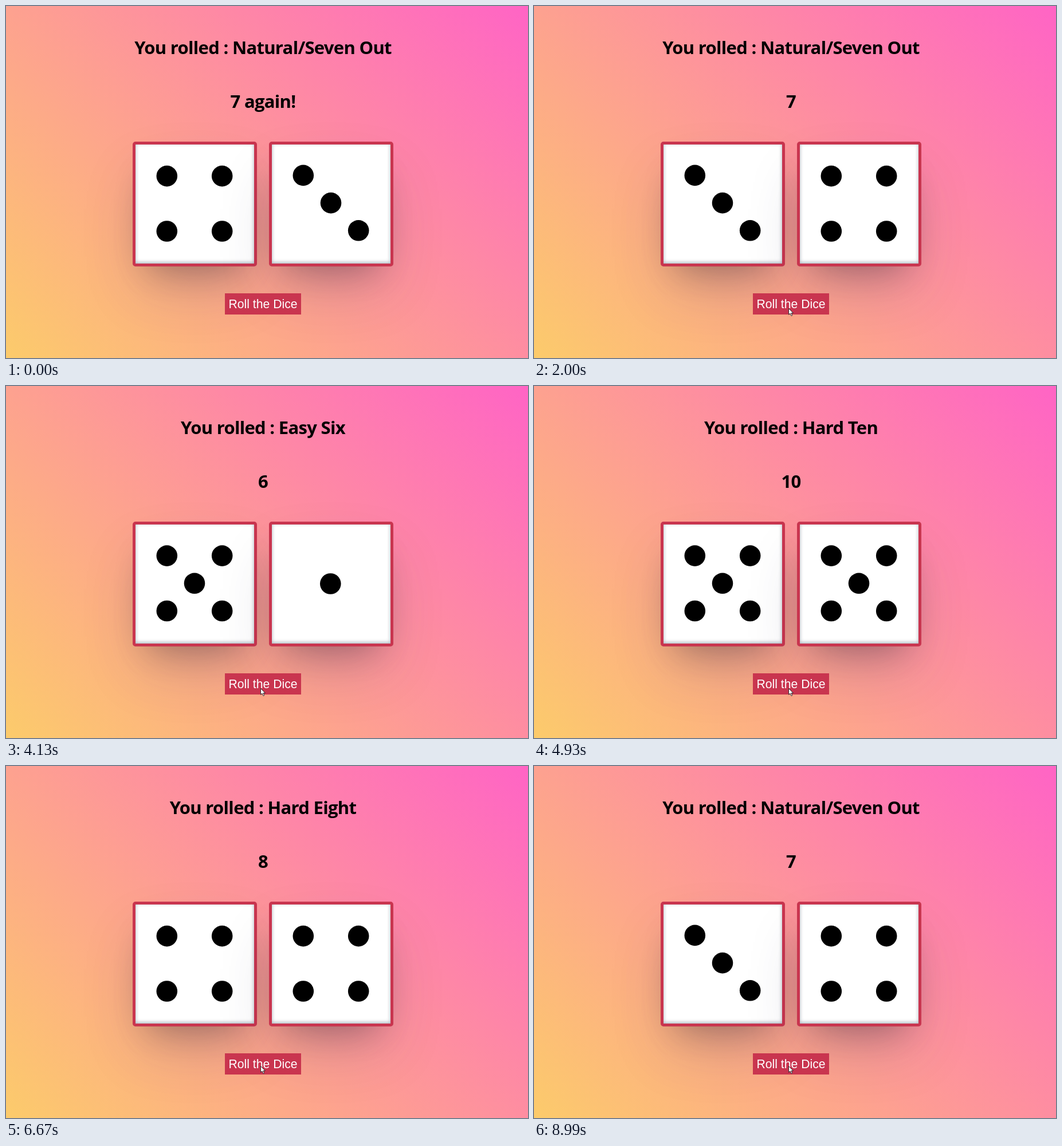
Recreate the animation shown at these times as an HTML page. Size 911 px wide and 615 px high, loop 9.39 s.

```html
<!DOCTYPE html>
<html lang="en">
<head>
<meta charset="utf-8">
<title>Roll the Dice</title>
<style>
  html, body { margin: 0; width: 100%; height: 100%; overflow: hidden; }
  #stage {
    position: relative; width: 911px; height: 615px; overflow: hidden;
    background: linear-gradient(45deg, #fccb6b, #ff64c5);
  }
  #stage > * { position: absolute; box-sizing: border-box; }
  .line {
    left: 0; width: 897px; text-align: center; white-space: pre; color: #000;
    font: 700 31px/42px "Open Sans", "Noto Sans", sans-serif; letter-spacing: -.7px;
  }
  #title { top: 51px; }
  #total { top: 145px; }
  .die {
    top: 237px; width: 217.5px; height: 218px; background: #fff;
    border: 5px solid #c9354f; border-radius: 5px;
    box-shadow: rgba(50, 50, 93, .25) 0 50px 100px -20px,
      rgba(0, 0, 0, .3) 0 30px 60px -30px,
      rgba(10, 37, 64, .35) 0 -2px 6px 0 inset;
  }
  .die svg { position: absolute; left: 0; top: 0; }
  #button {
    left: 382px; top: 501.5px; width: 133px; height: 37.5px;
    background: #c9354f; color: #fff; text-align: center;
    font: 21.2px/37.5px "Liberation Sans", Arial, sans-serif;
  }
  #click {
    left: 435px; width: 17px; height: 17px; border-radius: 50%;
    background: rgba(236, 196, 0, .68);
  }
  #cursor { left: 0; top: 0; overflow: visible; }
</style>
</head>
<body>
<div id="stage">
  <div id="title" class="line"></div>
  <div id="total" class="line"></div>
  <div class="die" style="left:220.5px"><svg width="208" height="208"></svg></div>
  <div class="die" style="left:458.7px"><svg width="208" height="208"></svg></div>
  <div id="button">Roll the Dice</div>
  <div id="click"></div>
  <svg id="cursor" width="9" height="14">
    <path d="M.5 .5V11.2L3 9 5 13.4 6.8 12.6 4.9 8.4H8.4Z" fill="#fff" stroke="#222" stroke-width=".9"/>
  </svg>
</div>
<script>
const LOOP = 9390;

// press time, result time, left die, right die, name
const rolls = [
  [-1, 0, 4, 3, 'Natural/Seven Out'],
  [1200, 1330, 2, 3, 'Five (Fever Five)'],
  [1930, 2000, 3, 4, 'Natural/Seven Out'],
  [2600, 2730, 3, 3, 'Hard Six'],
  [3330, 3400, 1, 1, 'Snake Eyes'],
  [4060, 4130, 5, 1, 'Easy Six'],
  [4790, 4930, 5, 5, 'Hard Ten'],
  [5600, 5730, 1, 2, 'Ace Deuce'],
  [6530, 6670, 4, 4, 'Hard Eight'],
  [7260, 7400, 5, 5, 'Hard Ten'],
  [8130, 8190, 4, 2, 'Easy Six'],
  [8860, 8990, 3, 4, 'Natural/Seven Out']
];

// pip columns and rows in units of the pip spacing, and the small vertical offset of each face
const corners = [[-1, -1], [1, 1], [1, -1], [-1, 1]];
const faceShift = { 1: .9, 2: .7, 3: -.5, 4: .7, 5: .2 };

const $ = id => document.getElementById(id);
const faces = document.querySelectorAll('.die svg');
const smooth = p => p * p * (3 - 2 * p);
const mix = (a, b, p) => a + (b - a) * p;

function pips(value) {
  const spots = corners.slice(0, value - value % 2);
  if (value % 2) spots.push([0, 0]);
  const nudge = value === 1 ? -.7 : 0;
  return spots.map(([x, y]) =>
    `<circle cx="${103 + nudge + x * 48.2}" cy="${102.6 + faceShift[value] + y * 48.2}" r="18.3"/>`
  ).join('');
}

function cursorAt(t) {
  const step = Math.min(10, Math.floor((t - 300) / 70));
  if (step < 6) {
    const p = smooth(step / 6);
    return [mix(622, 376, p), mix(559.5, 490, p)];
  }
  if (step < 10) {
    const p = smooth((step - 6) / 4);
    return [mix(376, 444, p), mix(490, 528, p)];
  }
  return [444, t < 5800 ? 528 : t < 5870 ? 526 : 524];
}

let shown = -1;
function showRoll(index) {
  if (index === shown) return;
  shown = index;
  const [, , left, right, name] = rolls[index];
  $('title').textContent = 'You rolled : ' + name;
  $('total').textContent = left + right + (index ? '' : ' again!');
  faces[0].innerHTML = pips(left);
  faces[1].innerHTML = pips(right);
}

function draw(t) {
  showRoll(rolls.findLastIndex(roll => t >= roll[1]));

  const [x, y] = cursorAt(t);
  $('cursor').style.display = t < 300 ? 'none' : '';
  $('cursor').style.transform = `translate(${x}px, ${y}px)`;

  const pressed = rolls.some(([press, done]) => t >= press && t < done && press > 0);
  $('click').style.display = pressed ? '' : 'none';
  $('click').style.top = y - 8 + 'px';
}

const start = performance.now();
function tick() {
  draw((performance.now() - start) % LOOP);
  requestAnimationFrame(tick);
}
tick();
</script>
</body>
</html>
```
